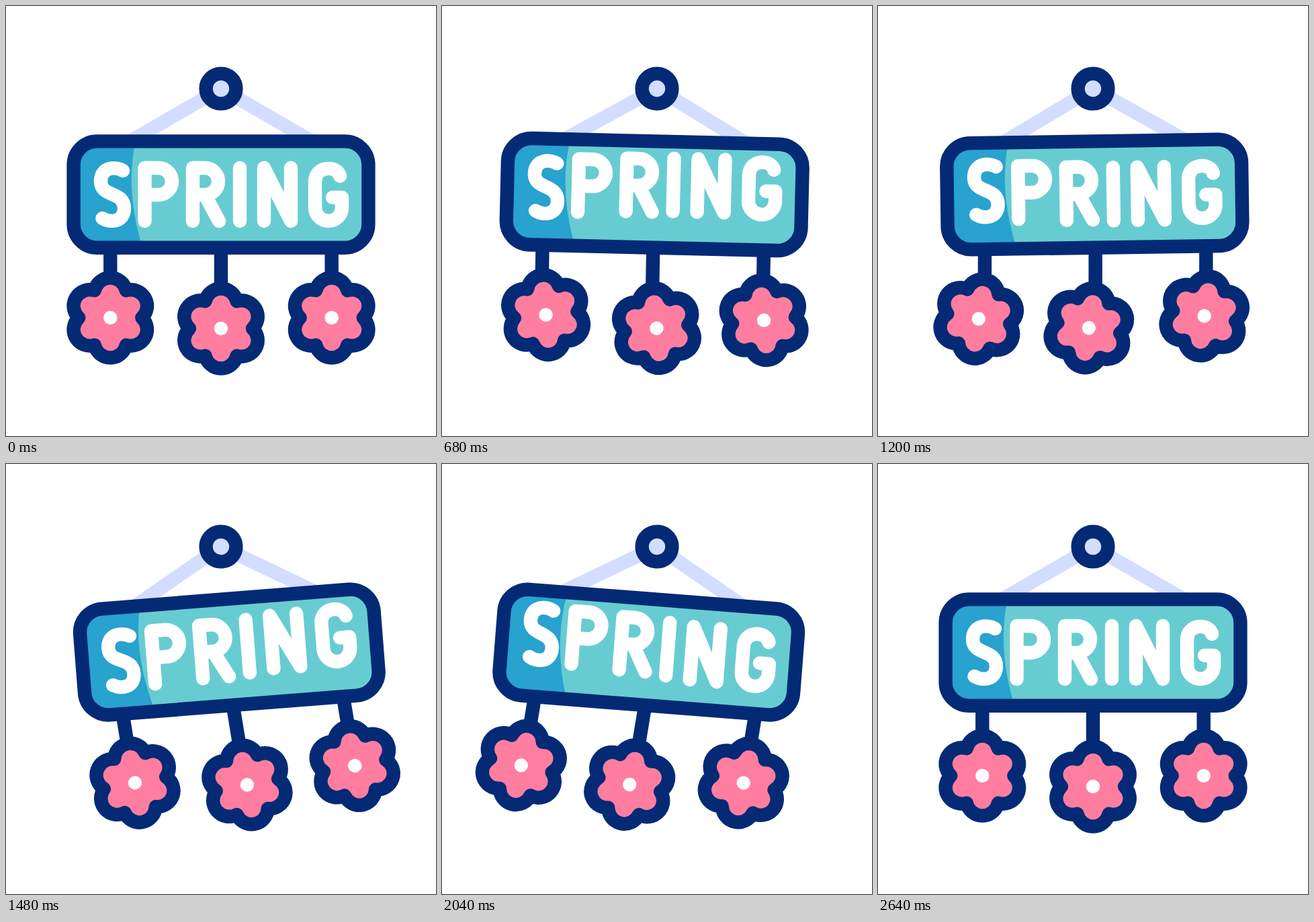
An HTML page for the animation above (3000 ms loop, 640 px wide and 640 px high).

```html
<!DOCTYPE html>
<html lang="en">
<head>
<meta charset="utf-8">
<title>Spring sign</title>
<style>
  html, body { margin: 0; width: 100%; height: 100%; overflow: hidden; background: #fff; }
  svg { display: block; width: 100vw; height: 100vh; }
  .outline { stroke: #042a75; stroke-width: 20.4; stroke-linejoin: round; }
  #letters { fill: none; stroke: #fff; stroke-width: 20.4; stroke-linecap: round; stroke-linejoin: round; }
</style>
</head>
<body>
<svg viewBox="0 0 640 640">
  <g id="sign">
    <path d="M168 211L320 123L472 211" fill="none" stroke="#d3ddff" stroke-width="20.4"/>
    <circle class="outline" cx="320" cy="123" r="22.4" fill="#d3ddff"/>
    <g id="pendants"></g>
    <rect x="100.6" y="201.4" width="438.8" height="158.3" rx="35" fill="#67ccd1"/>
    <path d="M192 205Q178 275 202 356H136a35 35 0 0 1-35-35V237a35 35 0 0 1 35-35Z" fill="#28a2ce"/>
    <rect class="outline" x="100.6" y="201.4" width="438.8" height="158.3" rx="35" fill="none"/>
    <g id="letters" role="img" aria-label="SPRING">
      <path d="M174 245C165 239 141 238 141 261C141 285 176 275 176 301C176 322 155 323 143.5 316"/>
      <path d="M206.5 320V241H227a20 20 0 0 1 0 40H206.5"/>
      <path d="M278 320V241H296a20 20 0 0 1 0 40H278M297 283L317 320"/>
      <path d="M348 241V320"/>
      <path d="M384 320V241L424 320V241"/>
      <path d="M497 253C493 237 460 237 460 262V300a20 20 0 0 0 40 0V285H486"/>
    </g>
  </g>
</svg>
<script>
const LOOP = 3000, STEP = 40, REST = 2640;
const FIRST_SWING = 380, HALF_SWING = 520;
const HOP_HEIGHT = 15, HOP_TIME = 1040;
const STEM_TOP = 369, STEM_DELAY = 55, FLOWER_DELAY = 260;

// Peak angles in degrees, positive to the right
const signPeaks = [5.5, -5.6, 4.8, -4.9];
const flowerPeaks = [7, -9.5, 7, -6.5];

// Each flower turns about a pivot on its stem
const pendants = [
  { x: 155.3, y: 464, pivot: 407 },
  { x: 320, y: 480, pivot: 419 },
  { x: 484.7, y: 464, pivot: 448 },
];

const sign = document.getElementById('sign');
const letters = [...document.getElementById('letters').children];
const ease = p => (1 - Math.cos(Math.PI * p)) / 2;
const turn = (node, angle, x, y) => node.setAttribute('transform', `rotate(${-angle} ${x} ${y})`);

// Six round petals on the sides of a hexagon
function petals(cx, cy, radius = 47, bend = 24.1) {
  const corner = k => {
    const a = (k * 60 - 120) * Math.PI / 180;
    return `${cx + radius * Math.cos(a)} ${cy + radius * Math.sin(a)}`;
  };
  let d = `M${corner(0)}`;
  for (let k = 1; k <= 6; k++) d += `A${bend} ${bend} 0 0 1 ${corner(k)}`;
  return d + 'Z';
}

document.getElementById('pendants').innerHTML = pendants.map(({ x, y }) => `<g>
  <path class="outline" d="M${x} 360V${y - 50}"/>
  <g>
    <path class="outline" d="${petals(x, y)}" fill="#ff7ea0"/>
    <circle cx="${x}" cy="${y}" r="10.2" fill="#fff"/>
  </g></g>`).join('');
const stems = [...document.getElementById('pendants').children];

// From rest through the given peaks and back to rest
function swing(t, peaks, delay = 0) {
  const keys = [0, ...peaks, 0];
  const time = k => k ? Math.min(REST, delay + FIRST_SWING + (k - 1) * HALF_SWING) : delay;
  const next = keys.findIndex((_, k) => t < time(k));
  if (next < 1) return 0;
  const from = keys[next - 1], begin = time(next - 1);
  return from + (keys[next] - from) * ease((t - begin) / (time(next) - begin));
}

// Two hops per loop
function hop(t) {
  return t <= 0 || t >= 2 * HOP_TIME ? 0 : HOP_HEIGHT * ease(2 * t / HOP_TIME);
}

function draw(now) {
  const t = Math.floor((now % LOOP) / STEP) * STEP;
  turn(sign, swing(t, signPeaks), 320, 123);
  const stemAngle = swing(t, signPeaks, STEM_DELAY);
  const flowerAngle = swing(t, flowerPeaks, FLOWER_DELAY);
  pendants.forEach(({ x, pivot }, i) => {
    turn(stems[i], stemAngle, x, STEM_TOP);
    turn(stems[i].lastElementChild, flowerAngle, x, pivot);
  });
  letters.forEach((letter, i) =>
    letter.setAttribute('transform', `translate(0 ${-hop(t - 430 + 77 * i)})`));
}

const start = performance.now();
function tick() {
  draw(performance.now() - start);
  requestAnimationFrame(tick);
}
tick();
</script>
</body>
</html>
```
